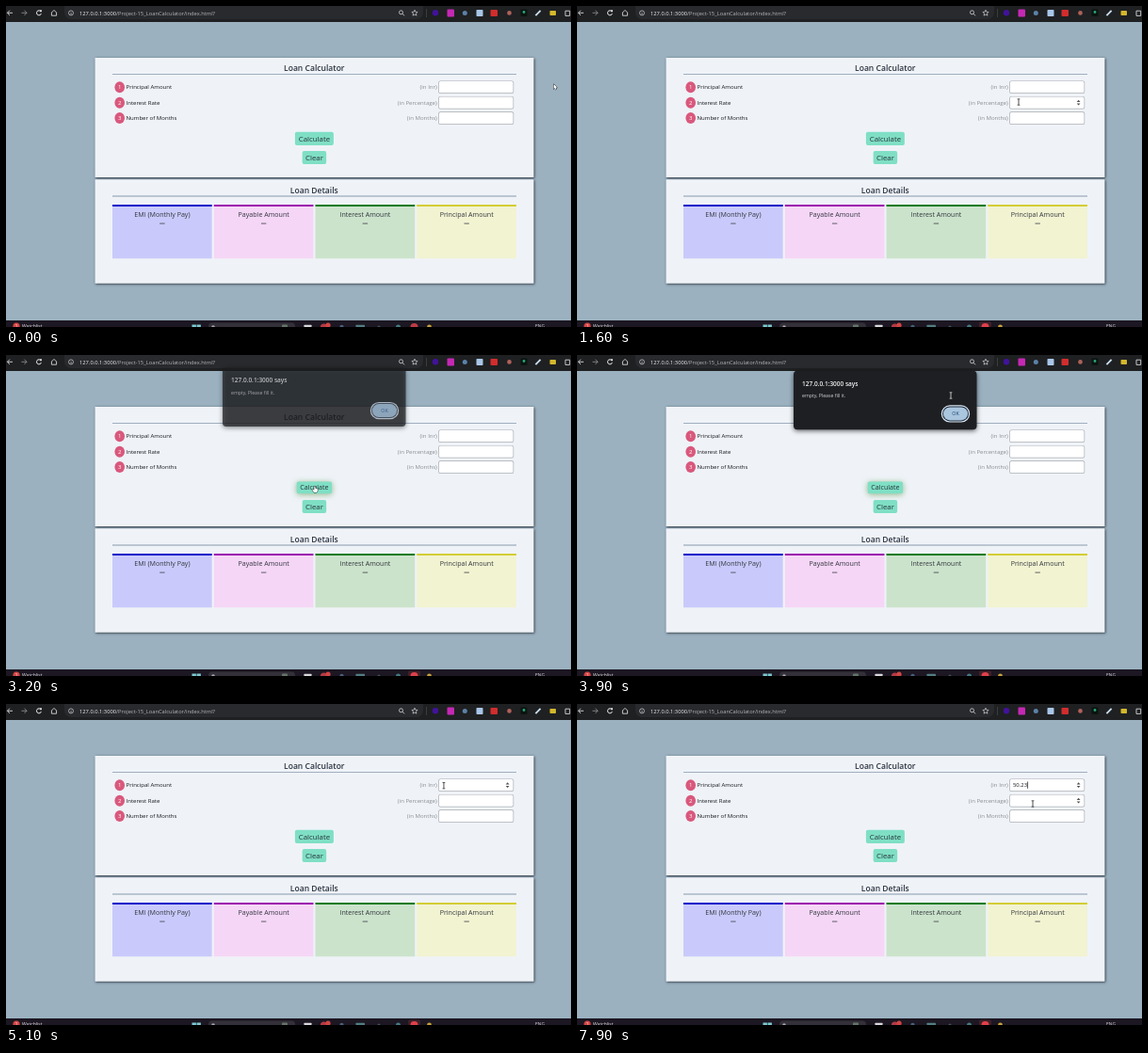
Animation of 600 by 341 pixels, one loop 8 s. Source, as an HTML page with a canvas:

```html
<!DOCTYPE html>
<html lang="en">
<head>
<meta charset="utf-8">
<title>Loan Calculator</title>
<style>
  html, body { margin: 0; width: 100%; height: 100%; overflow: hidden; background: #9bb1c0; }
  canvas { display: block; width: 600px; height: 341px; }
</style>
</head>
<body>
<canvas id="stage"></canvas>
<script>
const W = 600, H = 341, LOOP = 8000, STEP = 100;
const FONT = '"Open Sans", "Noto Sans", sans-serif';
const canvas = document.getElementById('stage');
const ctx = canvas.getContext('2d');
const dpr = window.devicePixelRatio || 1;
canvas.width = W * dpr;
canvas.height = H * dpr;

// Pointer stops: time, x, y
const PATH = [
  [0, 582, 83], [300, 582, 83], [900, 528, 96], [1400, 469, 102], [1900, 469, 102],
  [2600, 328, 142], [3300, 328, 142], [3900, 397, 43], [4200, 397, 43], [4400, 402, 61],
  [4600, 402, 61], [4800, 463, 88], [5300, 466, 86], [6200, 475, 86], [7700, 475, 86], [7900, 484, 106]
];
const TYPED = [[6300, '5'], [6500, '50'], [6600, '50.'], [6700, '50.2'], [6800, '50.23']];
const DIALOG = { open: 3200, close: 4800, end: 5000 };
const FOCUS = 5300;

const FIELDS = [
  { label: 'Principal Amount', hint: '(in Inr)', y: 86.2 },
  { label: 'Interest Rate', hint: '(in Percentage)', y: 102.7 },
  { label: 'Number of Months', hint: '(in Months)', y: 119.1 }
];
const TILES = [
  ['EMI (Monthly Pay)', '#0d10c9', '#c9cafb'],
  ['Payable Amount', '#9c0fae', '#f5d6f6'],
  ['Interest Amount', '#0b7a1b', '#cbe3cb'],
  ['Principal Amount', '#d3cd35', '#f2f3d1']
];

function box(x, y, w, h, fill, r = 0) {
  ctx.beginPath();
  ctx.roundRect(x, y, w, h, r);
  ctx.fillStyle = fill;
  ctx.fill();
}

function dot(x, y, r, fill, ry = r) {
  ctx.beginPath();
  ctx.ellipse(x, y, r, ry, 0, 0, Math.PI * 2);
  ctx.fillStyle = fill;
  ctx.fill();
}

function line(points, color, width = 1, close = false) {
  ctx.beginPath();
  points.forEach(([x, y], i) => i ? ctx.lineTo(x, y) : ctx.moveTo(x, y));
  if (close) ctx.closePath();
  ctx.strokeStyle = color;
  ctx.lineWidth = width;
  ctx.stroke();
}

function text(str, x, y, size, color, { weight = 400, align = 'left' } = {}) {
  ctx.font = `${weight} ${size}px ${FONT}`;
  ctx.textAlign = align;
  ctx.fillStyle = color;
  ctx.fillText(str, x, y);
}

function shadowed(color, blur, dx, dy, draw) {
  ctx.save();
  ctx.shadowColor = color;
  ctx.shadowBlur = blur * dpr;
  ctx.shadowOffsetX = dx * dpr;
  ctx.shadowOffsetY = dy * dpr;
  draw();
  ctx.restore();
}

function pointerAt(t) {
  const i = PATH.findIndex(p => p[0] > t);
  if (i < 0) return PATH[PATH.length - 1].slice(1);
  const [t0, x0, y0] = PATH[i - 1], [t1, x1, y1] = PATH[i];
  const k = (t - t0) / (t1 - t0), e = k * k * (3 - 2 * k);
  return [x0 + (x1 - x0) * e, y0 + (y1 - y0) * e];
}

const inside = ([px, py], x, y, w, h) => px >= x && px <= x + w && py >= y && py <= y + h;

function toolbar() {
  box(0, 0, W, 17, '#1f2022');
  box(62, 0, 381, 14, '#292a2d', [0, 0, 7, 7]);
  const ink = '#d5d7da';
  line([[7, 7.3], [1.5, 7.3]], ink, 0.9);
  line([[4, 4.7], [1.4, 7.3], [4, 9.9]], ink, 0.9);
  line([[16.5, 7.3], [22, 7.3]], '#8b8d91', 0.9);
  line([[19.5, 4.7], [22.1, 7.3], [19.5, 9.9]], '#8b8d91', 0.9);
  ctx.beginPath();
  ctx.arc(35, 7.3, 2.5, 0.3, 5.4);
  ctx.stroke();
  ctx.strokeStyle = ink;
  ctx.stroke();
  box(36, 4.2, 2, 2, ink);
  line([[48.4, 7], [51, 4.4], [53.6, 7], [53.6, 10.2], [48.4, 10.2]], ink, 0.9, true);
  ctx.beginPath();
  ctx.arc(69, 7.4, 2.5, 0, 7);
  ctx.lineWidth = 0.7;
  ctx.stroke();
  box(68.7, 6.9, 0.7, 1.9, ink);

  const host = '127.0.0.1:3000';
  text(host, 78, 9.5, 5.75, '#f0f0f2');
  const hostWidth = ctx.measureText(host).width;
  text('/Project-15_LoanCalculator/index.html?', 78 + hostWidth, 9.5, 5.75, '#b6b8bc');

  ctx.beginPath();
  ctx.arc(419.5, 6.8, 2, 0, 7);
  ctx.strokeStyle = ink;
  ctx.lineWidth = 0.8;
  ctx.stroke();
  line([[421, 8.3], [423, 10.3]], ink, 0.9);
  const star = Array.from({ length: 10 }, (_, i) => {
    const a = i * Math.PI / 5 - Math.PI / 2, r = i % 2 ? 1.5 : 3.3;
    return [434 + r * Math.cos(a), 7.5 + r * Math.sin(a)];
  });
  line(star, ink, 0.7, true);
  box(446, 3, 0.7, 9, '#4a4b4e');

  dot(456, 7.3, 3.2, '#41139a');
  box(468.5, 3.5, 7.5, 8, '#c528b4', 1);
  dot(487.3, 7.5, 2.5, '#5c82a8');
  box(499.5, 4, 7, 7, '#a9c6e8', 0.8);
  box(514.5, 4, 7.5, 7, '#d12d2d', 1);
  dot(534.5, 7.4, 2.3, '#b0625a');
  box(546.5, 3.5, 7, 7.5, '#0b1510', 1);
  dot(550, 6.5, 1.4, '#25a879');
  line([[562.4, 10.2], [567.6, 4.8]], '#c9e0f5', 1.8);
  box(577.5, 5, 6.5, 5, '#d3b72c', 0.8);
  line([[594, 5.2], [598.7, 5.2], [598.7, 10.4], [594, 10.4]], ink, 0.9, true);
}

function taskbar(t) {
  box(0, 334, W, 7, '#1c1722');
  dot(11, 340, 3.6, '#d64545');
  text('1', 11, 341.8, 4.5, '#fff', { align: 'center' });
  text('Watchlist', 17, 342.3, 5.1, '#e3e1e6');
  box(197.5, 338.5, 4.4, 3, '#7cc9d0');
  box(202.5, 338.5, 4.4, 3, '#7cc9d0');
  box(215, 336.5, 92, 8, '#343039', 4);
  dot(220, 341, 1.8, '#a9a7ad');
  box(293, 338.5, 6, 3, '#647568', 1);
  box(316.5, 338.7, 8, 3, '#d8d8dc', 0.5);
  dot(337.5, 341, 3.6, '#b43a45');
  dot(342, 339.2, 2.6, '#d04545');
  dot(356.5, 341, 2.2, '#48607c');
  box(371.5, 338.7, 9.5, 3, '#527d82', 0.5);
  dot(396, 341, 1.6, '#3e5358');
  dot(416.5, 341, 2.5, '#447b83');
  if (t >= 1000) box(427, 335.5, 13, 6, '#402029', 1.5);
  dot(433.5, 341, 4, t >= 1000 ? '#e0414b' : '#bd3c46');
  dot(449.5, 341, 2.4, '#c6a23b');
  text('ENG', 562, 342, 5, '#e3e1e6');
}

function heading(str, y) {
  text(str, 327.3, y, 8.55, '#2d3440', { weight: 600, align: 'center' });
  box(113, y + 2.8, 429, 0.9, '#8797ad');
}

function spinner(y) {
  for (const d of [-1, 1]) {
    ctx.beginPath();
    ctx.moveTo(530.7, y + d * 0.8);
    ctx.lineTo(534.5, y + d * 0.8);
    ctx.lineTo(532.6, y + d * 2.9);
    ctx.fillStyle = '#505050';
    ctx.fill();
  }
}

function button(label, y, w, hover) {
  ctx.save();
  ctx.translate(327.4, y);
  if (hover) ctx.scale(0.91, 0.91);
  const face = () => box(-w / 2, -7.1, w, 14.2, '#7fdfc5', 2);
  if (hover) shadowed('rgba(112,160,95,.75)', 6, 0, 1, face);
  else face();
  text(label, 0, 2.8, 7.85, '#26343a', { weight: 500, align: 'center' });
  ctx.restore();
}

function page(t, pointer, modal) {
  box(0, 17, W, 317, '#9bb1c0');
  for (const [y, h] of [[55, 127], [184.3, 110.5]])
    shadowed('rgba(20,28,36,.9)', 2.5, 0.7, 0.8, () => box(94.5, y, 466, h, '#eff3f8', 0.6));

  heading('Loan Calculator', 69.4);
  FIELDS.forEach(({ label, hint, y }, i) => {
    dot(120.7, y, 5.3, '#d9587c', 6);
    text(i + 1, 120.7, y + 2.2, 6.1, '#fff', { align: 'center' });
    text(label, 127.5, y + 2.1, 6.05, '#16191d', { weight: 500 });
    text(hint, 457.8, y + 2.1, 6.05, '#8a8d92', { align: 'right' });
    box(459.2, y - 6.8, 80, 13.6, '#a9adb3', 2);
    box(459.9, y - 6.1, 78.6, 12.2, '#fff', 1.5);
    const hover = !modal && inside(pointer, 459, y - 6.8, 80, 13.6);
    if (hover || (i === 0 && t >= FOCUS)) spinner(y);
  });

  if (t >= FOCUS) {
    const typed = TYPED.filter(([at]) => at <= t).pop() || [FOCUS, ''];
    text(typed[1], 463, 88.3, 5.9, '#15171a');
    const end = 463 + ctx.measureText(typed[1]).width;
    if (Math.floor((t - typed[0]) / 500) % 2 === 0) box(end + 0.3, 82.5, 0.7, 7.2, '#111');
  }

  const pressed = t >= DIALOG.open && t < 4600;
  button('Calculate', 140.9, 41, pressed || (!modal && inside(pointer, 307, 134, 41, 14)));
  button('Clear', 161, 25.5, false);

  heading('Loan Details', 198.7);
  TILES.forEach(([label, edge, fill], i) => {
    const x = 113 + i * 107.75;
    box(x, 211, 105.7, 57.3, fill);
    box(x, 211, 105.7, 2, edge);
    text(label, x + 52.9, 224.2, 7.1, '#33373f', { weight: 500, align: 'center' });
    box(x + 50.2, 230.6, 5.4, 0.9, '#4a4d55');
  });
}

function dialog(t) {
  if (t < DIALOG.open || t >= DIALOG.end) return;
  const opening = t < DIALOG.open + STEP, closing = t >= DIALOG.close;
  const shift = opening ? -3.3 : closing ? -2.6 - (t - DIALOG.close) / 100 : 0;
  ctx.save();
  ctx.globalAlpha = opening ? 0.72 : closing ? (t > DIALOG.close ? 0.4 : 0.96) : 1;
  ctx.translate(0, shift);
  shadowed('rgba(0,0,0,.6)', 5, 0, 1.5, () => box(230, 16.8, 194.5, 62.5, '#1e1f22', 4));
  text('127.0.0.1:3000 says', 239, 32.6, 6.5, '#f2f2f4', { weight: 600 });
  text('empty, Please fill it.', 239, 45.1, 5.2, '#d2d3d6');
  if (!closing) {
    box(386.8, 53.2, 30.4, 18.4, '#dbe8f5', 9.2);
    box(388, 54.4, 28, 16, '#1e2a3a', 8);
    box(389, 55.4, 26, 14, '#a9c6de', 7);
  } else {
    box(388, 54.4, 28, 16, '#a9c3dc', 8);
  }
  text('OK', 402, 64.4, 5.4, '#1b4376', { weight: 500, align: 'center' });
  ctx.restore();
}

function pointerKind(p, modal) {
  if (modal) {
    if (inside(p, 239, 38, 176, 9)) return 'beam';
    return inside(p, 307, 134, 41, 14) ? 'hand' : 'arrow';
  }
  if (inside(p, 307, 134, 41, 14)) return 'hand';
  return FIELDS.some(f => inside(p, 459, f.y - 6.8, 80, 13.6)) ? 'beam' : 'arrow';
}

function drawPointer([x, y], kind, light) {
  ctx.save();
  ctx.translate(x, y);
  if (kind === 'beam') {
    const ink = light ? '#e6e6e6' : '#222';
    line([[0, -3.2], [0, 3.2]], ink, 0.8);
    for (const s of [-3.2, 3.2]) line([[-1.4, s], [1.4, s]], ink, 0.7);
  } else {
    const shape = kind === 'hand'
      ? [[-0.7, -2.6], [0.5, -2.6], [0.5, -0.4], [2.8, 0.2], [2.8, 2.4], [1.9, 4], [-1, 4], [-2.7, 1.4], [-2, 0.7], [-0.7, 1.6]]
      : [[-0.4, 0], [-0.4, 5.2], [0.8, 4.1], [1.6, 5.9], [2.5, 5.5], [1.7, 3.7], [3.3, 3.6]];
    line(shape, '#222', 1, true);
    ctx.fillStyle = '#fff';
    ctx.fill();
  }
  ctx.restore();
}

function render(t) {
  const pointer = pointerAt(t);
  const modal = t >= DIALOG.open && t < DIALOG.close;
  ctx.setTransform(dpr, 0, 0, dpr, 0, 0);
  toolbar();
  page(t, pointer, modal);
  taskbar(t);
  dialog(t);
  drawPointer(pointer, pointerKind(pointer, modal), modal);
}

const start = performance.now();
function tick() {
  const t = (performance.now() - start) % LOOP;
  render(Math.floor(t / STEP) * STEP);
  requestAnimationFrame(tick);
}
tick();
</script>
</body>
</html>
```
